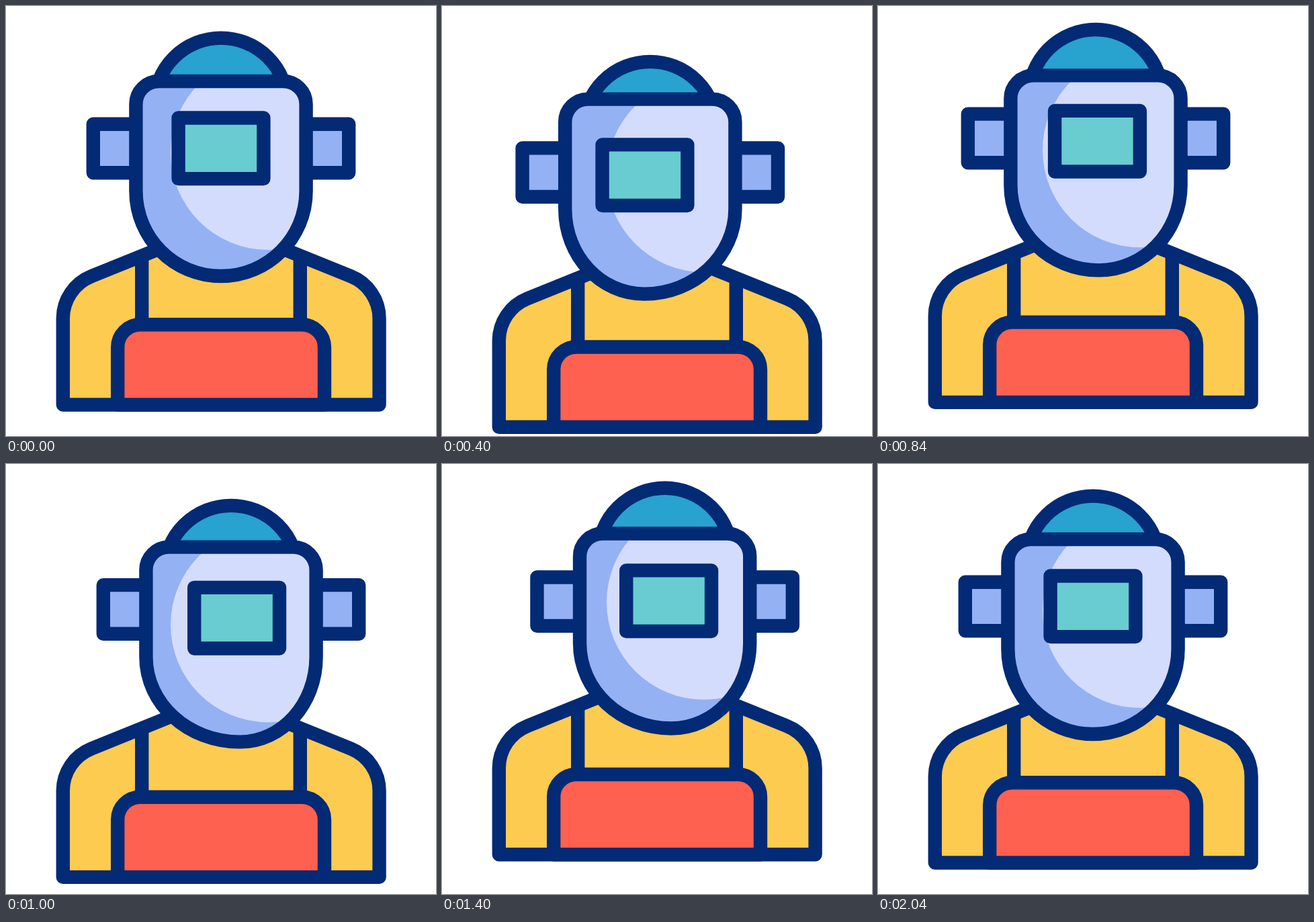
Write an HTML page with a canvas that moves like this. It is 640x640 px and loops after 2520 ms.

```html
<!DOCTYPE html>
<html lang="en">
<head>
<meta charset="utf-8">
<title>Welder</title>
<style>
html, body { margin: 0; width: 100%; height: 100%; overflow: hidden; background: #fff; }
canvas { display: block; width: 100vw; height: 100vh; object-fit: contain; }
</style>
</head>
<body>
<canvas id="stage" width="640" height="640"></canvas>
<script>
const ctx = document.getElementById('stage').getContext('2d');
const LOOP = 2520, STEP = 40, MOVE_END = 2040;
const END_LEG = 360, LEG = 320;
const NAVY = '#032a75', BLUE = '#94b1f4', LIGHT = '#d3dcfd', SKY = '#28a2ce',
      TEAL = '#68ccd0', YELLOW = '#fdcb50', RED = '#ff6150';

const clamp = (v, lo, hi) => Math.min(hi, Math.max(lo, v));

function ease(t, from, to) {
  const u = clamp((t - from) / (to - from), 0, 1);
  return u * u * (3 - 2 * u);
}

// Down-and-up swing through `count` alternating peaks, starting and ending at rest.
function swing(t, lag, count, size, bias = 0) {
  const peak = n => n < 0 || n >= count ? 0 : bias + (n % 2 ? -1 : 1) * size(n);
  const s = t - lag;
  const n = clamp(Math.floor((s - END_LEG + LEG) / LEG), 0, count);
  const from = n ? END_LEG + LEG * (n - 1) : 0;
  const span = n === 0 || n === count ? END_LEG : LEG;
  return peak(n - 1) + (peak(n) - peak(n - 1)) * ease(s, from, from + span);
}

const fade = (amp, ratio) => n => amp * ratio ** n;

const bodyY  = t => swing(t, 0, 4, n => 36 - 7.3 * n);
const domeY  = t => swing(t, 40, 5, fade(36.3, 0.685), -1);
const maskY  = t => swing(t, 40, 5, fade(26.6, 0.7));
const visorY = t => swing(t, 50, 5, fade(37, 0.68), 3);
const earY   = t => swing(t, 60, 5, fade(38.5, 0.5), -2.5);

// The head looks left, then right, then back to the middle.
const turn = (t, left, right, lead = 0) =>
  left * ease(t, 0, 490) +
  (right - left) * ease(t, 540 - lead, 1140 - lead) -
  right * ease(t, 1190, 1680);

const headX  = t => turn(t, -11.2, 19.2);
const visorX = t => turn(t, -19.8, 29.1, 15);
const chinX  = t => turn(t, -21, 34.5, 15);

function paint(path, fill) {
  if (fill) {
    ctx.fillStyle = fill;
    ctx.fill(path);
  }
  ctx.stroke(path);
}

function box(x, y, w, h, fill) {
  const p = new Path2D();
  p.rect(x, y, w, h);
  paint(p, fill);
}

function torsoPath() {
  const p = new Path2D();
  p.moveTo(84.8, 593.5);
  p.arcTo(84.8, 419.4, 262, 347.7, 67.6);
  p.lineTo(262, 347.7);
  p.lineTo(378.4, 347.7);
  p.arcTo(555.6, 419.4, 555.6, 593.5, 67.6);
  p.lineTo(555.6, 593.5);
  p.closePath();
  return p;
}

function strapsPath() {
  const p = new Path2D();
  for (const x of [202.2, 437.8]) {
    p.moveTo(x, 374);
    p.lineTo(x, 474);
  }
  return p;
}

function apronPath() {
  const p = new Path2D();
  p.moveTo(166.2, 593.5);
  p.arcTo(166.2, 474.3, 320, 474.3, 33.5);
  p.arcTo(474, 474.3, 474, 593.5, 33.5);
  p.lineTo(474, 593.5);
  p.closePath();
  return p;
}

const torso = torsoPath(), straps = strapsPath(), apron = apronPath();

function drawBody(dy) {
  ctx.save();
  ctx.translate(0, dy);
  paint(torso, YELLOW);
  paint(straps);
  paint(apron, RED);
  ctx.restore();
}

function maskPath(dx, dy, chin) {
  const l = 193.4 + dx, r = 446.6 + dx, top = 112 + dy, side = 275.3 + dy,
        low = 402 + dy, cx = 320 + chin, round = 0.553;
  const bend = side + (low - side) * round;
  const p = new Path2D();
  p.moveTo(l, side);
  p.arcTo(l, top, r, top, 34);
  p.arcTo(r, top, r, side, 34);
  p.lineTo(r, side);
  p.bezierCurveTo(r, bend, cx + (r - cx) * round, low, cx, low);
  p.bezierCurveTo(cx + (l - cx) * round, low, l, bend, l, side);
  p.closePath();
  return p;
}

function drawHead(t, shineY) {
  const dx = headX(t);

  for (const x of [129.8, 440.2]) box(x + dx, 175.7 + earY(t), 70, 72.6, BLUE);

  const dome = new Path2D();
  dome.arc(320 + dx, 146.6 + domeY(t), 99, 0, Math.PI * 2);
  paint(dome, SKY);

  const mask = maskPath(dx, maskY(t), chinX(t));
  ctx.fillStyle = BLUE;
  ctx.fill(mask);
  ctx.save();
  ctx.clip(mask);
  ctx.fillStyle = LIGHT;
  ctx.beginPath();
  ctx.arc(390, 218 + shineY, 145, 0, Math.PI * 2);
  ctx.fill();
  ctx.restore();
  ctx.stroke(mask);

  box(256.6 + visorX(t), 166.5 + visorY(t), 126.8, 90.6, TEAL);
}

function draw(t) {
  ctx.fillStyle = '#fff';
  ctx.fillRect(0, 0, 640, 640);
  ctx.strokeStyle = NAVY;
  ctx.lineWidth = 20.4;
  ctx.lineJoin = 'round';
  const dy = bodyY(t);
  drawBody(dy);
  drawHead(t, dy);
}

const start = performance.now();
function tick() {
  const t = (performance.now() - start) % LOOP;
  draw(Math.min(Math.floor(t / STEP) * STEP, MOVE_END));
  requestAnimationFrame(tick);
}
tick();
</script>
</body>
</html>
```
